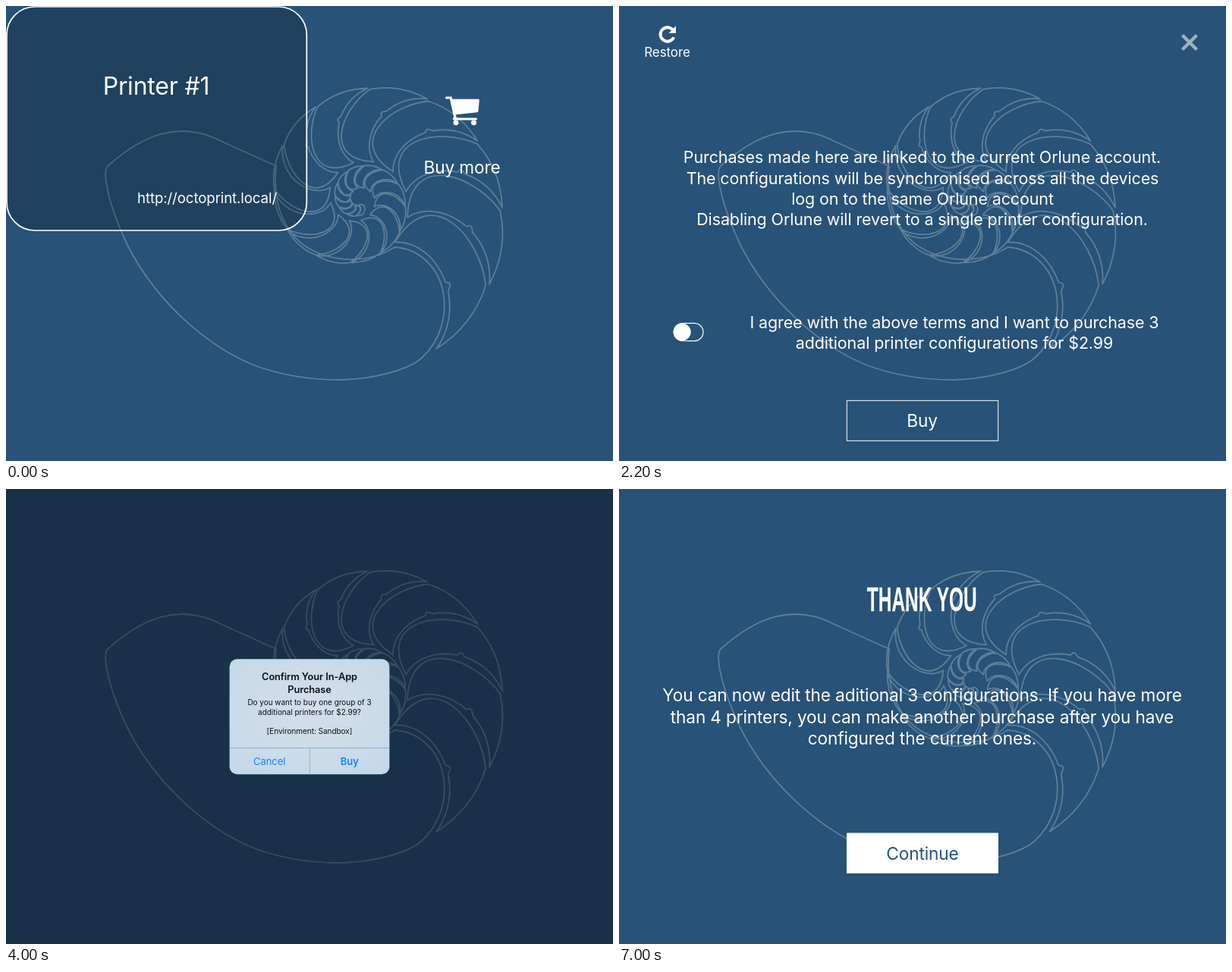
Recreate the animation shown at these times as an HTML page. Size 800x600 px, loop 8 s.

```html
<!DOCTYPE html>
<html lang="en">
<head>
<meta charset="utf-8">
<title>In-app purchase</title>
<style>
  html, body { margin: 0; width: 100%; height: 100%; overflow: hidden; background: #285277; }
  svg { display: block; width: 800px; height: 600px; }
  text {
    font-family: Inter, "Noto Sans", sans-serif;
    font-optical-sizing: none;
    letter-spacing: -.006em;
    text-anchor: middle;
    fill: #fff;
  }
  .body { font-size: 21.5px; }
  .big { font-size: 22.65px; }
  .ink { fill: #285277; }
  .alert text { fill: #0b0f14; }
  .alert .title { font-size: 12.8px; font-weight: 600; }
  .alert .note { font-size: 9.95px; letter-spacing: 0; }
  .alert .action { font-size: 13px; fill: #1480fa; }
  .alert .strong { font-weight: 600; }
  .alert path { stroke: #86add0; fill: none; }
  .heading { font: bold 44px "Liberation Sans", Arial, sans-serif; letter-spacing: 0; stroke: #fff; stroke-width: .3; }
</style>
</head>
<body>
<svg viewBox="0 0 800 600">
  <defs>
    <radialGradient id="glass" cx=".5" cy=".45" r=".7">
      <stop offset="0" stop-color="#d3dfe9"/>
      <stop offset="1" stop-color="#c5d8e8"/>
    </radialGradient>
    <filter id="soft" x="-30%" y="-30%" width="160%" height="170%">
      <feDropShadow dx="0" dy="1.5" stdDeviation="1.2" flood-opacity=".3"/>
    </filter>
  </defs>

  <rect width="800" height="600" fill="#285277"/>
  <path id="shell" fill="none" stroke="#fff" stroke-width="1.8" stroke-linejoin="round" opacity=".25"/>

  <g data-from="0" data-to="1000">
    <rect x="1" y="1" width="395.3" height="295" rx="37" fill="#000" fill-opacity=".2" stroke="#fff" stroke-width="1.7"/>
    <text x="198" y="116.5" font-size="32">Printer #1</text>
    <text x="265" y="259.5" font-size="18.7">http://octoprint.local/</text>
    <g fill="#fff">
      <path d="M587 122.8H622.5Q624 122.8 623.8 124.5L622.5 138.5Q622.3 140 620.7 140.2L590.5 143.6Z"/>
      <path d="M580.5 121H586.2L592 147.5Q589.5 149 591 149H619.5" fill="none" stroke="#fff" stroke-width="3.2" stroke-linecap="round"/>
      <circle cx="593" cy="153.7" r="3.5"/>
      <circle cx="616.5" cy="153.7" r="3.5"/>
    </g>
    <text class="big" x="601" y="220.5">Buy more</text>
  </g>

  <g data-from="1000" data-to="4000">
    <path d="M70.6 31.2A9.2 9.2 0 1 0 72.2 41.2" fill="none" stroke="#fff" stroke-width="4"/>
    <path d="M75 26.3V35.8H65.5Z" fill="#fff"/>
    <text x="63.5" y="66.5" font-size="17">Restore</text>
    <path d="M742.5 38.5L761.5 57.5M761.5 38.5L742.5 57.5" stroke="#fff" stroke-width="4.4" opacity=".55"/>
    <g class="body">
      <text x="399.5" y="207.3">Purchases made here are linked to the current Orlune account.</text>
      <text x="400" y="234.6">The configurations will be synchronised across all the devices</text>
      <text x="400" y="262">log on to the same Orlune account</text>
      <text x="399.5" y="289.3">Disabling Orlune will revert to a single printer configuration.</text>
      <text x="442" y="425">I agree with the above terms and I want to purchase 3</text>
      <text x="442" y="452.3">additional printer configurations for $2.99</text>
    </g>
  </g>

  <g data-from="1000" data-to="3000">
    <rect x="72" y="418.3" width="39" height="23.4" rx="11.7" fill="none" stroke="#fff" stroke-width="1.2"/>
    <circle cx="83.3" cy="430" r="11.4" fill="#fff" filter="url(#soft)"/>
    <rect x="300.3" y="520.3" width="199.4" height="53" fill="none" stroke="#fff" stroke-width="1"/>
    <text class="big" x="399.5" y="555">Buy</text>
  </g>

  <g data-from="3000" data-to="4000">
    <rect x="71.4" y="417.7" width="40.2" height="24.6" rx="12.3" fill="#4cd964"/>
    <circle cx="99.2" cy="430" r="11.2" fill="#fff" filter="url(#soft)"/>
    <rect x="300" y="520" width="200" height="53.5" fill="#fff"/>
    <text class="big ink" x="399.5" y="555">Buy</text>
  </g>

  <g data-from="6000" data-to="8000">
    <text class="heading" transform="translate(399.2 161) scale(.555 1)">THANK YOU</text>
    <g class="big">
      <text x="399.5" y="280">You can now edit the aditional 3 configurations. If you have more</text>
      <text x="399.5" y="308.6">than 4 printers, you can make another purchase after you have</text>
      <text x="399.5" y="337.2">configured the current ones.</text>
    </g>
    <rect x="300" y="453.5" width="200" height="53.3" fill="#fff"/>
    <text class="big ink" x="400" y="488.5">Continue</text>
  </g>

  <rect data-from="4000" data-to="7000" width="800" height="600" opacity=".4"/>

  <g class="alert" data-from="4000" data-to="6000">
    <rect x="294.6" y="224.2" width="210.8" height="152" rx="10" fill="url(#glass)"/>
    <text class="title" x="400" y="252.2">Confirm Your In-App</text>
    <text class="title" x="400" y="269.3">Purchase</text>
    <text class="note" x="400" y="285.3">Do you want to buy one group of 3</text>
    <text class="note" x="400" y="297.8">additional printers for $2.99?</text>
    <text class="note" x="400" y="322.6">[Environment: Sandbox]</text>
    <path d="M294.6 341.5H505.4M400.3 341.5V376.2"/>
    <text class="action" x="347.2" y="363.8">Cancel</text>
    <text class="action strong" x="452.8" y="363.8">Buy</text>
  </g>

  <g class="alert" data-from="6000" data-to="7000">
    <rect x="294.6" y="239.2" width="210.8" height="122" rx="10" fill="#cfdfed"/>
    <text class="title" x="400" y="267">You’re all set.</text>
    <text class="note" x="400" y="283">Your purchase was successful.</text>
    <text class="note" x="400" y="307.8">[Environment: Sandbox]</text>
    <path d="M294.6 326.5H505.4"/>
    <text class="action strong" x="400" y="348.8">OK</text>
  </g>
</svg>
<script>
  const LOOP = 8000;

  // Point in a chamber's own polar frame: radius factor and angle offset
  const polar = (r, a) => (k, d) => {
    const t = (a + d) * Math.PI / 180;
    return [465 + r * k * Math.cos(t), 255 + r * k * Math.sin(t)];
  };
  const fmt = p => p.map(v => v.toFixed(1)).join(' ');
  const curve = (...pts) => 'C' + pts.map(fmt).join(' ');

  // Cubic wall with a small bump pushed towards the chamber's middle
  function wall(a, b, c, d, mid, bump) {
    let out = '';
    for (let i = 1; i <= 80; i++) {
      const t = i / 80, u = 1 - t;
      const p = a.map((v, j) =>
        u * u * u * v + 3 * u * u * t * b[j] + 3 * u * t * t * c[j] + t * t * t * d[j]);
      const dx = mid[0] - p[0], dy = mid[1] - p[1];
      const push = bump * Math.exp(-(((t - .58) / .025) ** 4)) / Math.hypot(dx, dy);
      out += 'L' + fmt([p[0] + dx * push, p[1] + dy * push]);
    }
    return out;
  }

  function chamber(n) {
    const at = polar(222 * Math.exp(-.0775 * n - .001 * n * n), 62.6 - 29.6 * n);
    const tip = at(1, 0), next = at(.91, -28.5), root = at(.333, -12.7);
    return 'M' + fmt(tip) + 'Q' + fmt(at(1.01, -14.9)) + ' ' + fmt(next)
      + curve(at(.758, -45), at(.449, -76.8), root)
      + wall(root, at(.51, -34.7), at(.89, -20.3), tip, at(.78, -30), n < 7 ? 5 * .9 ** n : 0) + 'Z';
  }

  let outline = 'M356 211C325 197 303 187 283 178C228 150 180 170 134 211'
    + 'C126 220 136 265 160 315C195 385 260 446 325 473C370 490 415 493 440 493'
    + 'C485 492 530 480 548 464C574 440 580 408 577 383C572 345 545 320 512 318'
    + 'C485 336 435 344 392 315C360 290 352 250 356 211Z';
  for (let n = 0; n < 24; n++) outline += chamber(n);
  document.getElementById('shell').setAttribute('d', outline);

  const layers = [...document.querySelectorAll('[data-from]')];
  function draw() {
    const t = performance.now() % LOOP;
    for (const el of layers)
      el.style.display = t >= +el.dataset.from && t < +el.dataset.to ? '' : 'none';
    requestAnimationFrame(draw);
  }
  draw();
</script>
</body>
</html>
```
